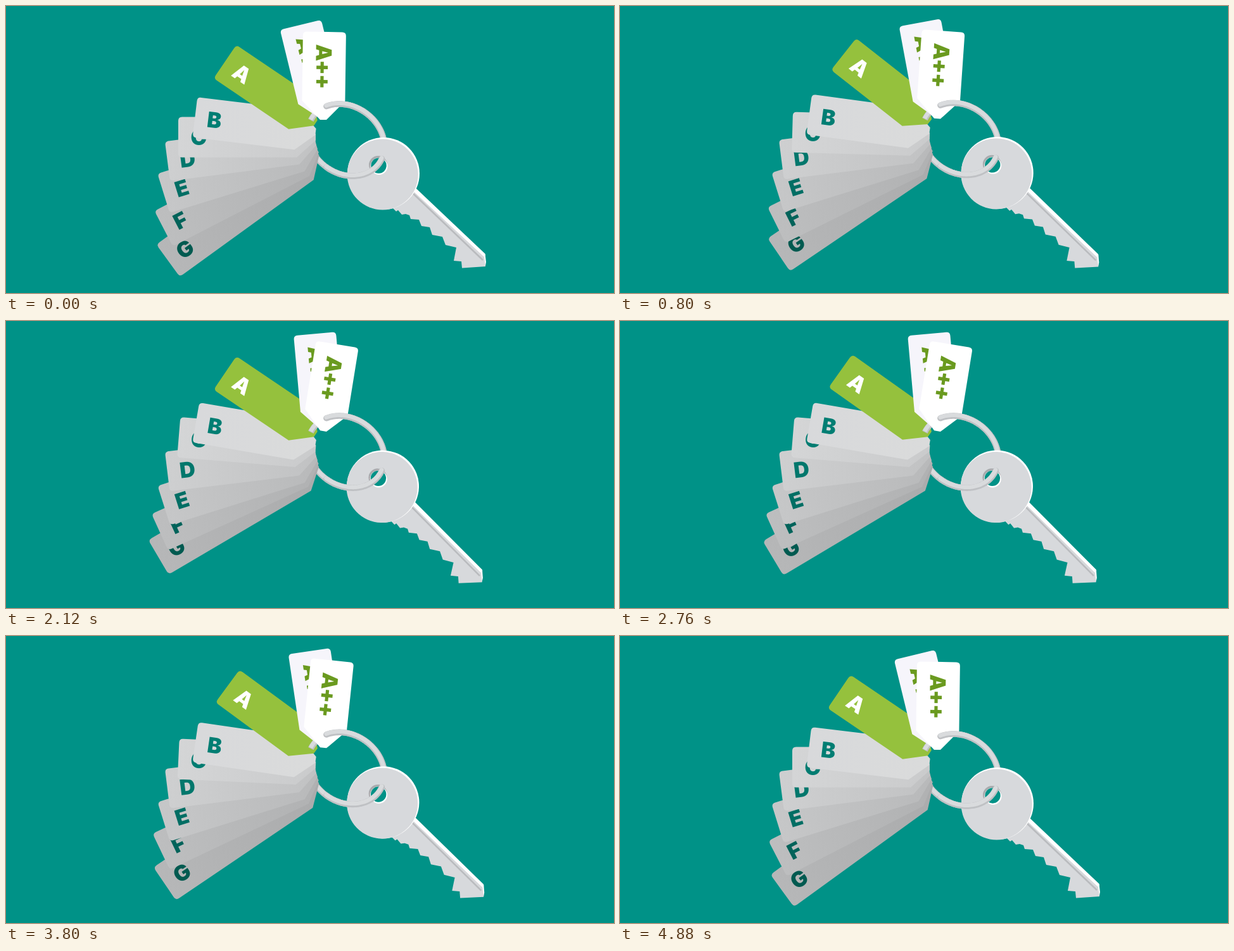
Write an HTML page that moves like this. It is 960x454 px and loops after 4920 ms.

```html
<!DOCTYPE html>
<html lang="en">
<head>
<meta charset="utf-8">
<title>Energy label key ring</title>
<style>
  html, body { margin: 0; width: 100%; height: 100%; overflow: hidden; background: #009287; }
  svg { display: block; width: 100%; height: 100%; }
  text { font: 900 34px Inter, "Open Sans", sans-serif; letter-spacing: -1px; }
</style>
</head>
<body>
<svg id="stage" viewBox="0 0 960 454"></svg>
<script>
const LOOP = 4920;
const stage = document.getElementById('stage');

// x, y: ring end of the tag; len, w: size; from, to: angles of the swing;
// snap: sharpness of the swing; lead: phase in degrees
const tags = [
  { label: 'G',   x: 491.5, y: 232, len: 291, w: 63, from: -36,   to: -30.4, snap: 0,   lead: 11, fill: ['#b6b7b8', '#aaabac'], ink: '#005a50' },
  { label: 'F',   x: 491.5, y: 227, len: 273, w: 63, from: -27.3, to: -24.3, snap: .07, lead: -6, fill: ['#bdbebf', '#b0b1b2'], ink: '#00635a' },
  { label: 'E',   x: 490.5, y: 221.5, len: 253, w: 65, from: -17.2, to: -17.5, snap: .05, fill: ['#c6c7c8', '#b8b9ba'], ink: '#006e64' },
  { label: 'D',   x: 489,   y: 215.5, len: 236, w: 63, from: -7.3,  to: -6.9,  snap: .05, fill: ['#cecfd0', '#c1c2c3'], ink: '#00776c' },
  { label: 'C',   x: 489,   y: 207.5, len: 217, w: 64, from: 0,     to: 4.8,   snap: .06, fill: ['#d4d5d6', '#cacbcc'], ink: '#007c71' },
  { label: 'B',   x: 489,   y: 199, len: 192, w: 64, from: 6.9,   to: 9.9,   snap: .02, fill: ['#d8d9db', '#dadbdb'], ink: '#007e73' },
  { label: 'A',   x: 489,   y: 185, len: 173, w: 64, fill: ['#95c13d', '#95c13d'], ink: '#fff' },
  { label: 'A+',  x: 501, y: 176.5, len: 151, w: 67, from: 76.3,  to: 85,    snap: .09, fill: ['#f6f5fb', '#f6f5fb'], ink: '#6a9a1f' },
  { label: 'A++', x: 501, y: 180, len: 139, w: 68, from: 90.8,  to: 99.3,  snap: .09, fill: ['#fff', '#fff'], ink: '#6a9a1f' }
];

// The green tag swings on its own: time, angle
const greenKeys = [[0, 34.1], [1150, 39.3], [2250, 33.9], [3300, 37], [LOOP, 34.1]];

function tagMarkup(tag, i) {
  const h = tag.w / 2, end = -tag.len, r = 6;
  const outline = `M0-5V5L-30 ${h}H${end + r}Q${end} ${h} ${end} ${h - r}` +
    `V${r - h}Q${end} ${-h} ${end + r} ${-h}H-30Z`;
  return `<linearGradient id="shade${i}">
      <stop offset="0" stop-color="${tag.fill[0]}"/>
      <stop offset="1" stop-color="${tag.fill[1]}"/>
    </linearGradient>
    <g id="tag${i}">
      <path d="${outline}" fill="url(#shade${i})"/>
      <text x="${end + 19.5}" y="13" fill="${tag.ink}">${tag.label}</text>
    </g>`;
}

function ringPoint(deg) {
  const p = deg * Math.PI / 180, tilt = Math.PI / 5;
  const x = 64 * Math.cos(p), y = 53 * Math.sin(p);
  return [537 + x * Math.cos(tilt) - y * Math.sin(tilt),
          212 + x * Math.sin(tilt) + y * Math.cos(tilt)];
}

function ringArc(from, to, cap = 'round') {
  let d = '';
  for (let a = from; a <= to; a += 2) {
    d += (d ? 'L' : 'M') + ringPoint(a).map(v => v.toFixed(2)).join(' ');
  }
  return `<g class="ring" fill="none" stroke-linecap="${cap}">
    <path d="${d}" stroke="#bfc1c4" stroke-width="9.5"/>
    <path d="${d}" stroke="#d9dbdd" stroke-width="6.5" transform="translate(-.3 -1.3)"/>
  </g>`;
}

const keyMarkup = `<g id="key">
  <path fill="#d7d9dc" d="M606 316L612 321L616 325L619 323L625 330L631 329L637 331L639 337L652 338
    L656 348L669 350L673 362L689 365L694 378L711 382L707 403L719 404L720 414.5L757 412L757 393L644 287Z"/>
  <path fill="none" stroke="#b9bbbe" stroke-width="2.5" d="M640 294L753 402"/>
  <path fill="#fff" d="M643 285L648 289L756.5 392L758 405L757 411L755 397L640 290Z"/>
  <circle cx="596" cy="265" r="57" fill="#fff"/>
  <circle cx="594.7" cy="266.5" r="56" fill="#d7d9dc"/>
  <circle cx="587.5" cy="251.5" r="14.5" fill="#a9abae"/>
  <circle cx="589" cy="253.5" r="13.5" fill="#fff"/>
  <circle cx="588.5" cy="252.5" r="12.2" fill="#009287"/>
</g>`;

const tagParts = tags.map(tagMarkup);
stage.innerHTML = '<rect width="960" height="454" fill="#009287"/>' +
  ringArc(0, 360) +
  tagParts.slice(0, 7).join('') +
  ringArc(172, 196, 'butt') +
  tagParts.slice(7).join('') +
  ringArc(208, 368) +
  keyMarkup +
  ringArc(-10, 90);

const tagNodes = tags.map((_, i) => document.getElementById('tag' + i));
const rings = stage.querySelectorAll('.ring');
const key = document.getElementById('key');

// 0 at rest, 1 at the far side of the swing
function swing(t, snap, lead = 0) {
  const a = t / LOOP * 2 * Math.PI + lead * Math.PI / 180;
  return .5 - .5 * Math.cos(a) + snap * (1 - Math.cos(2 * a));
}

function greenAngle(t) {
  const i = greenKeys.findIndex(k => k[0] > t);
  const [t0, a0] = greenKeys[i - 1], [t1, a1] = greenKeys[i];
  return a0 + (a1 - a0) * (.5 - .5 * Math.cos(Math.PI * (t - t0) / (t1 - t0)));
}

function draw(t) {
  const lift = swing(t, .05);
  tags.forEach((tag, i) => {
    const angle = tag.label === 'A' ? greenAngle(t)
      : tag.from + (tag.to - tag.from) * swing(t, tag.snap, tag.lead);
    tagNodes[i].setAttribute('transform', `translate(${tag.x} ${tag.y - 6 * lift}) rotate(${angle})`);
  });
  rings.forEach(r => r.setAttribute('transform', `translate(0 ${-5 * lift})`));
  key.setAttribute('transform', `translate(${-lift} ${-3.5 * lift}) rotate(${1.7 * lift} 595.5 264.5)`);
}

const start = performance.now();
function tick() {
  draw((performance.now() - start) % LOOP);
  requestAnimationFrame(tick);
}
draw(0);
requestAnimationFrame(tick);
</script>
</body>
</html>
```
